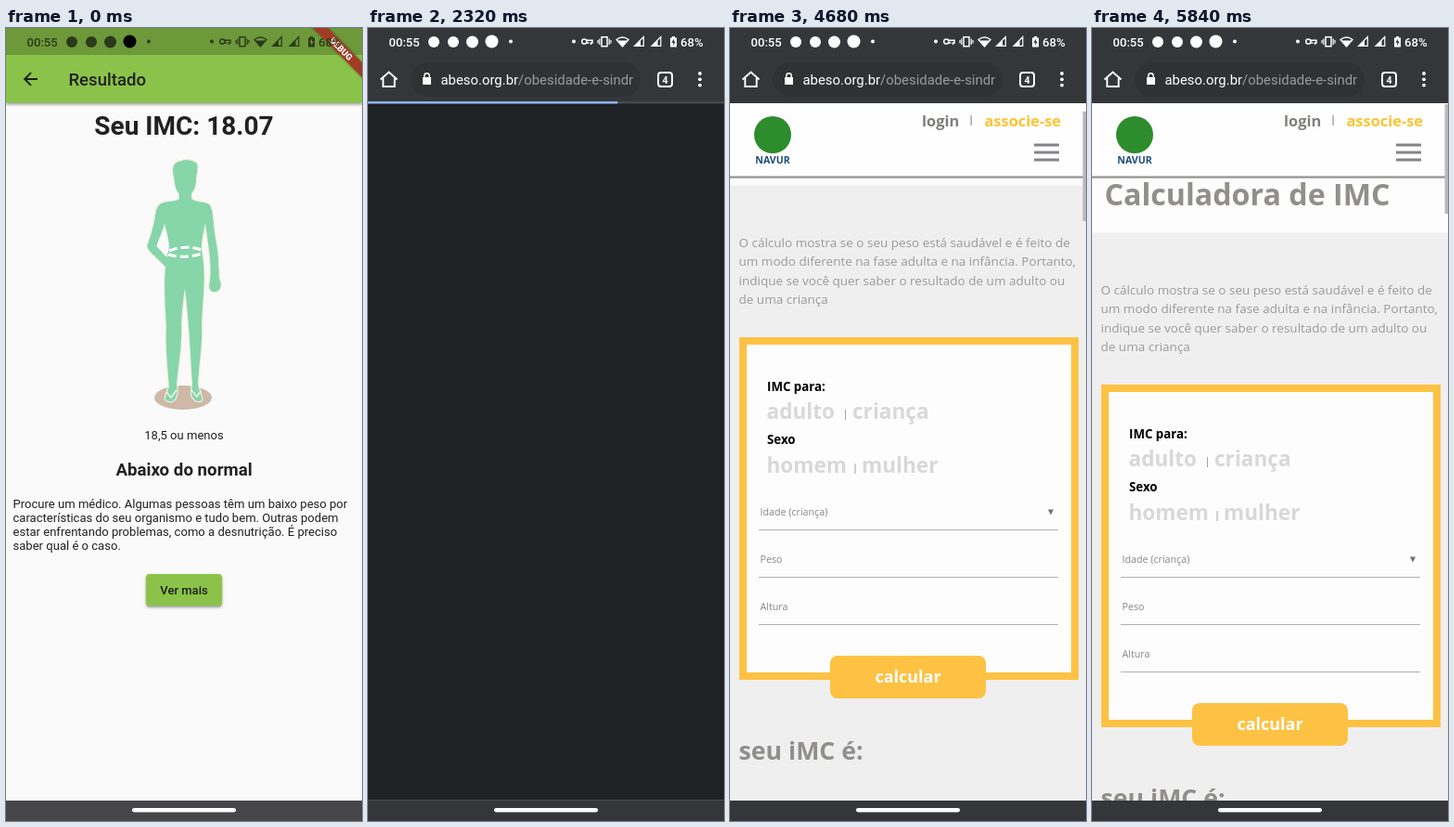
An HTML page that plays this animation: 384x854 px, repeating every 5880 ms.

```html
<!DOCTYPE html>
<html lang="pt-BR">
<head>
<meta charset="utf-8">
<title>Resultado</title>
<style>
  html, body { margin: 0; width: 100%; height: 100%; overflow: hidden; background: #000; }
  svg { display: block; width: 384px; height: 854px; }
  text { font-family: Roboto, "Open Sans", sans-serif; white-space: pre; }
  .loaded text { font-family: "Open Sans", "Noto Sans", sans-serif; }
  #app { color: #212121; }
  #app, #browser { transform-origin: 192px 427px; }
  #status { color: #2b3a1a; }
  #status.light { color: #fff; }
</style>
</head>
<body>
<svg viewBox="0 0 384 854" xmlns="http://www.w3.org/2000/svg">
  <defs>
    <clipPath id="view"><rect y="81" width="384" height="751"/></clipPath>
    <clipPath id="stage"><rect width="384" height="854"/></clipPath>
    <filter id="soft" x="-20%" y="-40%" width="140%" height="200%"><feGaussianBlur stdDeviation="1.6"/></filter>
  </defs>
  <rect width="384" height="854"/>

  <g id="app" clip-path="url(#stage)">
    <rect width="384" height="854" fill="#fafafa"/>
    <rect y="76" width="384" height="6.5" fill="#4c5540" opacity=".55" filter="url(#soft)"/>
    <rect width="384" height="80.5" fill="#8bc34a"/>
    <rect width="384" height="29" fill="#6d993a"/>
    <path d="M34 55H20.5M27 48.2L20.2 55L27 61.8" fill="none" stroke="#1c1f18" stroke-width="1.9"/>
    <g id="appText" fill="currentColor"></g>

    <ellipse cx="191" cy="398" rx="31" ry="13" fill="#ceb8a8"/>
    <g fill="#86d6a9" stroke="#f3efdf" stroke-width="2.4" stroke-linejoin="round" paint-order="stroke">
      <path d="M181 160C179 152 180 146 186 144C193 141 202 142 206 146C207 151 206 156 205 162
        C205 170 203 175 200 178L200 184C205 188 214 187 219 190C223 194 223 203 224 212
        C225 226 229 238 229 252L230 270C233 276 232 283 226 284C220 285 218 279 220 273
        C222 256 219 238 217 224L215 210C213 220 210 230 211 240C213 250 214 262 213.500 276
        C213 294 211 308 211 322C212 342 208 362 207 384C208 390 212 396 211 401
        C207 404 201 400 200 394L201 382C199 352 198 322 193 280
        C191 292 190 304 189 320C190 342 186 362 184 383C185 390 185 398 181 401
        C176 404 171 401 172 397L176 386C174 362 172 342 173 322C172 302 170 282 172 257
        L164 249C159 244 152 239 152.500 234C157 222 160 210 161 202C162 194 164 190 170 188
        C177 186 184 187 187 184L186.500 178C183 174 182 168 181 160Z"/>
    </g>
    <path d="M171 211C169 220 164 228 162.500 235C166 239 170 243 173.500 247C174 242 176 239 176 234C175 226 173 218 171 211Z" fill="#fafafa"/>
    <path d="M176 240Q193 233 211 239M175 244Q193 249 211 243" fill="none" stroke="#fff" stroke-width="3" stroke-dasharray="9 4"/>
    <path d="M173 392L178 398L184 390M200 390L206 397L210 391" fill="none" stroke="#f3f2ee" stroke-width="1.5"/>

    <rect x="151" y="590" width="82" height="34" rx="4" fill="#4f5a42" opacity=".6" filter="url(#soft)"/>
    <rect x="151" y="588" width="82" height="34" rx="3.7" fill="#8bc34a"/>
    <text x="192" y="609.7" font-size="13.07" font-weight="500" text-anchor="middle" fill="#1a1d14">Ver mais</text>
    <rect y="832" width="384" height="22" fill="#47474a"/>
    <g transform="translate(384 0) rotate(45)">
      <rect x="-40" y="26.200" width="80" height="11.200" fill="#000" opacity=".45" filter="url(#soft)"/>
      <rect x="-40" y="26.200" width="80" height="11.200" fill="#a03c26"/>
      <text y="35.200" font-size="9.500" font-weight="900" text-anchor="middle" fill="#fff">DEBUG</text>
    </g>
  </g>

  <g id="browser">
    <rect width="384" height="854" fill="#35363a"/>
    <rect y="81" width="384" height="751" fill="#202124"/>
    <rect y="831" width="384" height="1" fill="#4c4d51"/>
    <rect x="46" y="37" width="248" height="37" rx="18.500" fill="#2f3134"/>
    <g fill="none" stroke="#fff" stroke-width="1.900">
      <path d="M13.500 55.500L22.500 47.500L31.500 55.500M16.300 54V63H28.700V54"/>
      <rect x="313" y="48" width="15" height="15" rx="3"/>
    </g>
    <path d="M59 53H68V61H59Z" fill="#fff"/>
    <path d="M60.800 53V51.500A2.700 2.700 0 0 1 66.200 51.500V53" fill="none" stroke="#fff" stroke-width="1.400"/>
    <text x="320.500" y="59.500" font-size="10.500" font-weight="700" text-anchor="middle" fill="#fff">4</text>
    <g fill="#fff"><circle cx="358" cy="49" r="1.900"/><circle cx="358" cy="55.300" r="1.900"/><circle cx="358" cy="61.600" r="1.900"/></g>
    <text x="78.500" y="61" font-size="14.900" fill="#fff">abeso.org.br<tspan fill="#9a9b9e">/obesidade-e-sindr</tspan></text>
    <g id="loading">
      <rect y="79" width="384" height="2.500" fill="#47494f"/>
      <rect id="bar" y="79" height="2.500" fill="#8ab4f0"/>
    </g>

    <g id="site" clip-path="url(#view)">
      <rect y="81" width="384" height="751" fill="#efeff0"/>
      <g id="content">
        <rect y="60" width="384" height="160.500" fill="#fdfdfd"/>
        <rect x="14" y="388" width="358" height="361" fill="#fdfdfd" stroke="#fdc243" stroke-width="8"/>
        <path d="M31 591.500H354M31 642.500H354M31 693.500H354" stroke="#b0b0b0"/>
        <path d="M343 569.500H349L346 575.500Z" fill="#707070"/>
        <rect x="108" y="727" width="168" height="46" rx="8" fill="#fdc243"/>
        <g id="plain"></g>
        <g id="styled" class="loaded"></g>
      </g>
      <rect y="81" width="384" height="79" fill="#fefefe"/>
      <rect y="159.500" width="384" height="2.200" fill="#929293"/>
      <rect x="259.500" y="94" width="1.200" height="11" fill="#929293"/>
      <g id="plainHead"></g>
      <g id="styledHead" class="loaded">
        <circle cx="46" cy="115" r="20" fill="#2d8c2c"/>
        <path d="M328 126H355M328 134H355M328 142H355" stroke="#84848a" stroke-width="3.200"/>
      </g>
      <rect id="thumb" x="380.500" width="3.500" height="118" fill="#b9b9bb"/>
    </g>
  </g>

  <g id="status" fill="currentColor">
    <text x="22.500" y="19.800" font-size="13.100" font-weight="500">00:55</text>
    <circle cx="71" cy="15" r="6"/><circle cx="92" cy="15" r="6"/><circle cx="112.500" cy="15" r="6.500"/>
    <circle id="dot" cx="133.500" cy="14.500" r="7"/>
    <circle cx="154" cy="14.500" r="2"/><circle cx="222" cy="14.500" r="2"/>
    <g fill="none" stroke="currentColor" stroke-width="1.500">
      <circle cx="233.300" cy="14.500" r="2.600"/>
      <path d="M236 13.300H242V16H240.500V18M236 16H238.500"/>
      <rect x="252" y="9.700" width="6" height="10"/>
      <path d="M249.800 11.500V18M260.200 11.500V18M248 13V16.500M262 13V16.500" stroke-width="1.200"/>
      <path d="M268 12.500Q274.500 7.500 281 12.500L274.500 20Z" stroke-width="1.300"/>
      <path d="M287.500 19.300H297.300V9.500ZM306 19.300H315.800V9.500Z" stroke-width="1.200"/>
    </g>
    <path d="M269.500 13.500H279.500L274.500 20ZM287.500 19.500L294 13V19.500ZM306 19.500L312.500 13V19.500Z"/>
    <path fill-rule="evenodd" d="M326 10.500H328V9H331V10.500H333V20.500H326ZM330 11.500L327.400 15.700H329.200V19L331.700 14.600H330Z"/>
    <text x="337" y="19.800" font-size="13.100" font-weight="500">68%</text>
  </g>
  <rect x="136" y="840" width="112" height="4.500" rx="2.250" fill="#fff"/>
</svg>

<script>
const LOOP = 5880;
const $ = id => document.getElementById(id);

function label(parent, str, x, y, size, fill, weight = 400, anchor = 'start') {
  const el = document.createElementNS('http://www.w3.org/2000/svg', 'text');
  const attrs = { x, y, 'font-size': size, 'font-weight': weight, 'text-anchor': anchor };
  if (fill) attrs.fill = fill;
  for (const key in attrs) el.setAttribute(key, attrs[key]);
  el.textContent = str;
  parent.append(el);
}

function buildApp() {
  const g = $('appText');
  label(g, 'Resultado', 67.5, 62, 18.6, null, 500);
  label(g, 'Seu IMC: 18.07', 192, 115.3, 28, null, 700, 'middle');
  label(g, '18,5 ou menos', 192, 442.6, 13.07, null, 400, 'middle');
  label(g, 'Abaixo do normal', 192, 481.8, 18.7, null, 700, 'middle');
  ['Procure um médico. Algumas pessoas têm um baixo peso por',
   'características do seu organismo e tudo bem. Outras podem',
   'estar enfrentando problemas, como a desnutrição. É preciso',
   'saber qual é o caso.'
  ].forEach((line, i) => label(g, line, 7.5, 516.8 + 15 * i, 13.07));
}

// Page text before (v = 0) and after (v = 1) the web font arrives
function buildSite(v) {
  const g = $(v ? 'styled' : 'plain'), head = $(v ? 'styledHead' : 'plainHead');
  const pick = (a, b) => v ? b : a;
  const grey = '#918f8c', body = '#9b9a99', pale = '#d8d8da', field = '#878788', accent = '#fdc434';

  label(head, 'login', pick(208, 207), 106, pick(17, 16.4), '#7f7e7c', 700);
  label(head, 'associe-se', 357, 106, pick(17, 16.4), accent, 700, 'end');
  if (v) label(head, 'NAVUR', 46, 146, 10.6, '#1d4c78', 700, 'middle');

  label(g, 'Calculadora de IMC', pick(13, 13.5), pick(190, 191.3), pick(33.5, 32.2), grey, 700);
  const last = pick(['ou de', 'uma criança'], ['ou', 'de uma criança']);
  ['O cálculo mostra se o seu peso está saudável e é feito de',
   'um modo diferente na fase adulta e na infância. Portanto,',
   'indique se você quer saber o resultado de um adulto ' + last[0],
   last[1]
  ].forEach((line, i) => label(g, line, 9.5, 287 + 20.3 * i, pick(14, 13.5), body));

  const small = pick(14, 13.3), big = pick(24.2, 22.6);
  label(g, 'IMC para:', 40, 441.7, small, '#000', 700);
  label(g, 'adulto', 39.5, pick(471, 472), big, pale, 700);
  label(g, '|', pick(116.5, 121.5), 470, 11, field);
  label(g, 'criança', pick(126, 132), pick(471, 472), big, pale, 700);
  label(g, 'Sexo', 40, 499.3, small, '#000', 700);
  label(g, 'homem', 39.5, pick(529, 530), big, pale, 700);
  label(g, '|', pick(130, 132), 528, 11, field);
  label(g, 'mulher', pick(140, 142), pick(529, 530), big, pale, 700);
  ['Idade (criança)', 'Peso', 'Altura'].forEach((name, i) =>
    label(g, name, 32.5, pick(575, 576) + 51.1 * i, pick(11, 10.7), field));
  label(g, 'calcular', 192, 756, pick(18.7, 18), '#fff', 700, 'middle');
  label(g, 'seu iMC é:', 9.5, 839, pick(28, 26.7), grey, 700);
  ['Como chegamos ao número à esquerda: o índice de',
   'massa corporal de um adulto é o seu peso em quilos',
   '(por exemplo, 80 kg), dividido por sua altura ao',
   'quadrado (vamos imaginar, 1,80 m x 1,80 m).'
  ].forEach((line, i) => label(g, line, 18.5, 927 + 23.2 * i, 13.4, body));
}

const span = (t, a, b) => Math.min(1, Math.max(0, (t - a) / (b - a)));
const smooth = u => u * u * (3 - 2 * u);
const show = (id, on) => $(id).setAttribute('visibility', on ? 'inherit' : 'hidden');

function scrollAt(t) {
  return 162.4 * (smooth(span(t, 4366, 5205)) - smooth(span(t, 5320, 5780)));
}

function draw(t) {
  // Opening the browser
  $('app').style.transform = `scale(${1 - 0.06 * smooth(span(t, 1790, 2120))})`;
  const enter = smooth(span(t, 1900, 2120));
  $('browser').style.opacity = enter;
  $('browser').style.transform = `scale(${0.92 + 0.08 * enter})`;
  $('status').classList.toggle('light', enter > 0.5);
  $('dot').setAttribute('fill', enter > 0.5 ? '#fff' : '#000');

  // Loading
  const ready = t >= 2960, styled = t >= 4000;
  $('bar').setAttribute('width', 269 * span(t, 2000, 2320) + 115 * span(t, 2320, 2920));
  show('loading', !ready);
  show('site', ready);
  for (const part of ['', 'Head']) {
    show('plain' + part, ready && !styled);
    show('styled' + part, ready && styled);
  }

  // Scrolling
  const y = scrollAt(t);
  $('content').setAttribute('transform', `translate(0 ${-Math.round(y)})`);
  $('thumb').setAttribute('y', 82 + y * 0.152);
  show('thumb', t >= 4366);
}

buildApp();
buildSite(0);
buildSite(1);
const start = performance.now();
function tick() {
  draw((performance.now() - start) % LOOP);
  requestAnimationFrame(tick);
}
draw(0);
requestAnimationFrame(tick);
</script>
</body>
</html>
```
